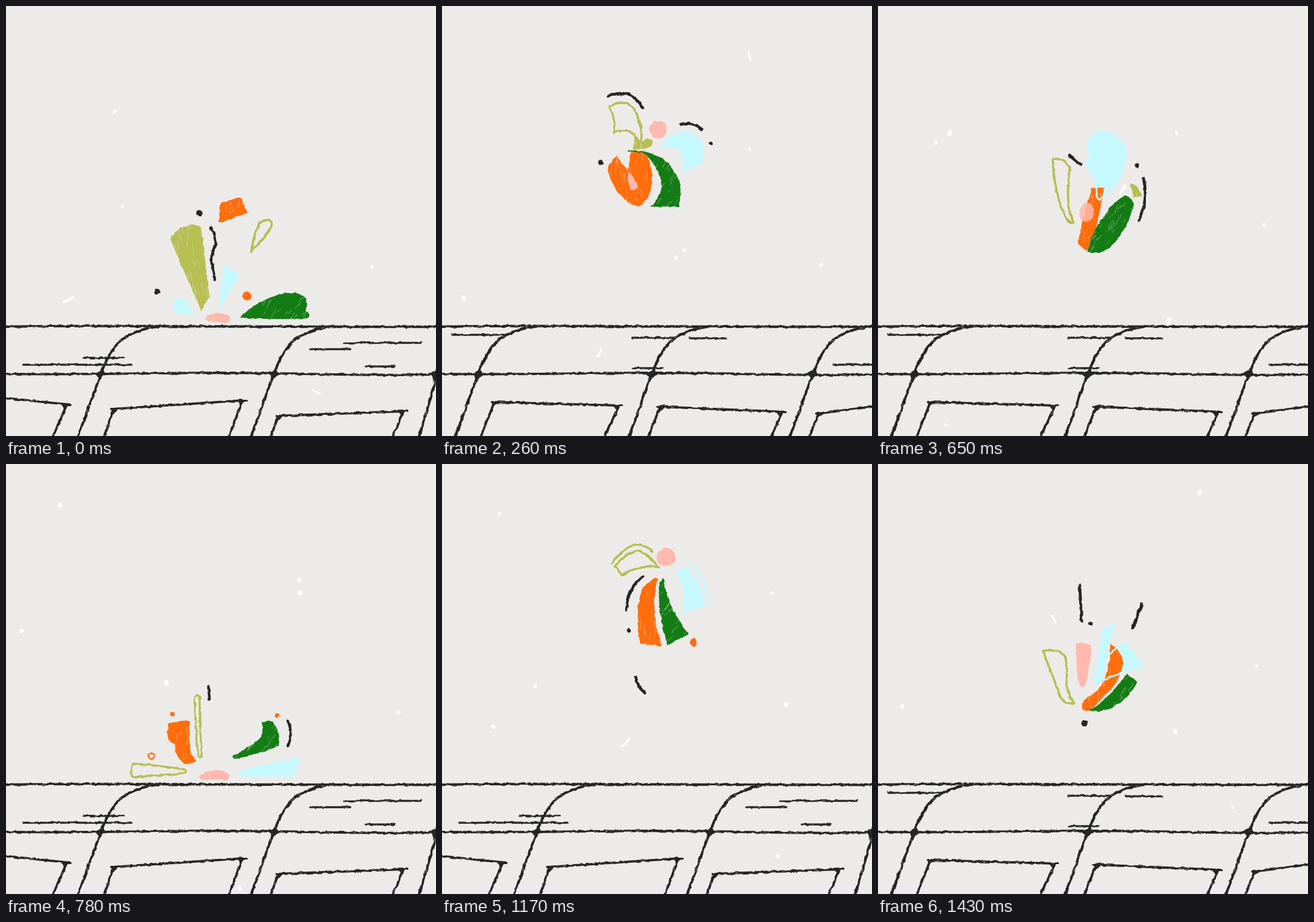
Recreate the animation shown at these times as an HTML page. Size 748x748 px, loop 1560 ms.

```html
<!DOCTYPE html>
<html lang="en">
<head>
<meta charset="utf-8">
<title>Leaping shapes</title>
<style>
html, body { margin: 0; width: 100%; height: 100%; overflow: hidden; background: #ecebe9; }
svg { display: block; width: 100vw; height: 100vh; }
</style>
</head>
<body>
<svg id="stage" viewBox="0 0 748 748" fill="none" stroke-linecap="round" stroke-linejoin="round">
  <defs>
    <filter id="rough" filterUnits="userSpaceOnUse" x="-10" y="0" width="768" height="758" color-interpolation-filters="sRGB">
      <feTurbulence type="fractalNoise" baseFrequency="0.11" numOctaves="2" seed="4"/>
      <feDisplacementMap in="SourceGraphic" scale="4.5" xChannelSelector="R" yChannelSelector="G"/>
    </filter>
  </defs>
</svg>
<script>
const STEP = 130, COUNT = 12;
const BG = '#ecebe9', INK = '#262626', ORANGE = '#ff6d0c', GREEN = '#147c15',
      OLIVE = '#b7be52', BLUE = '#c6f9ff', PINK = '#ffb9ae';
const stage = document.getElementById('stage');
const defs = stage.querySelector('defs');

let seed = 7;
const rand = (a, b) => {
  seed = (seed * 16807) % 2147483647;
  return a + (b - a) * seed / 2147483647;
};

function add(parent, tag, attrs) {
  const el = document.createElementNS('http://www.w3.org/2000/svg', tag);
  for (const k in attrs) el.setAttribute(k, attrs[k]);
  parent.appendChild(el);
  return el;
}
const layer = attrs => add(stage, 'g', { display: 'none', ...attrs });

// Pale crayon scratches kept inside a filled outline
let clips = 0;
function scratch(parent, d, angle, density, alpha) {
  const n = d.match(/-?\d+(\.\d+)?/g).map(Number);
  const xs = n.filter((_, i) => i % 2 === 0), ys = n.filter((_, i) => i % 2);
  const x0 = Math.min(...xs), x1 = Math.max(...xs), y0 = Math.min(...ys), y1 = Math.max(...ys);
  const id = 'clip' + clips++;
  add(add(defs, 'clipPath', { id }), 'path', { d });
  let marks = '';
  for (let i = (x1 - x0) * (y1 - y0) * density; i > 0; i--) {
    const len = rand(5, 20), a = angle + rand(-0.12, 0.12);
    marks += `M${rand(x0, x1).toFixed(1)} ${rand(y0, y1).toFixed(1)}l${(len * Math.cos(a)).toFixed(1)} ${(len * Math.sin(a)).toFixed(1)}`;
  }
  const g = add(parent, 'g', { 'clip-path': `url(#${id})` });
  add(g, 'path', { d: marks, stroke: BG, 'stroke-width': 0.9, opacity: alpha });
}

// Line with dry brush gaps
function brush(parent, d, width) {
  add(parent, 'path', { d, stroke: INK, 'stroke-width': width });
  add(parent, 'path', { d, stroke: BG, 'stroke-width': width * 0.35, opacity: 0.35,
    'stroke-dasharray': '1 17 3 41 2 9 5 60' });
}

// Shapes: [colour, path] filled, [colour, path, width] stroked, [colour, x, y, r] dot
function drawShape(g, [color, a, b, c]) {
  if (typeof a === 'number') add(g, 'circle', { cx: a, cy: b, r: c, fill: color });
  else if (b) add(g, 'path', { d: a, stroke: color, 'stroke-width': b });
  else {
    add(g, 'path', { d: a, fill: color });
    if ([ORANGE, GREEN, OLIVE].includes(color))
      scratch(g, a, color === GREEN ? 2.2 : 1.45, 0.0042, 0.5);
  }
}

const poses = {
  crouch: [
    [ORANGE, 'M375 342L405 333Q409 333 411 338L420 360L372 377Q369 377 370 371L373 346Z'],
    [OLIVE, 'M286 406Q296 384 325 380Q340 380 341 391Q346 440 354 507Q346 514 340 532Q336 520 330 508Q308 458 286 406Z'],
    [OLIVE, 'M427 427C430 402 436 384 444 376C452 370 461 373 463 377C462 388 448 404 427 427Z', 4.2],
    [INK, 'M356 386Q366 400 364 416Q356 434 358 448L363 475', 5],
    [BLUE, 'M379 451L406 468Q386 500 372 528L372 510Z'],
    [BLUE, 'M290 517Q294 508 304 508Q316 510 327 537L298 535Q290 528 290 517Z'],
    [PINK, 'M346 544Q352 534 368 534Q386 535 390 543Q390 551 376 551Q352 552 346 544Z'],
    [GREEN, 'M407 541Q442 509 484 500Q512 496 522 508Q526 520 521 531Q530 534 527 541Q522 546 510 544Q460 546 407 542Z'],
    [INK, 337, 360, 5], [INK, 263, 497, 5], [ORANGE, 419, 505, 8]
  ],
  tuck: [
    [INK, 'M289 157Q305 150 324 153Q340 160 349 177', 5],
    [INK, 'M415 206Q436 200 452 214', 5],
    [OLIVE, 'M346 237Q350 218 341 194Q334 173 319 169Q304 166 291 175Q304 200 298 221Q320 211 334 223', 3.8],
    [OLIVE, 'M333 221L346 236Q358 228 367 232Q367 246 355 249L331 248Q337 236 333 221Z'],
    [PINK, 376, 215, 15.5],
    [BLUE, 'M381 244Q392 221 426 218Q450 222 455 248L454 273Q436 279 421 292Q419 266 413 248Q400 246 381 244Z'],
    [INK, 468, 239, 3], [INK, 276, 272, 4.5],
    [GREEN, 'M324 250Q360 251 385 266Q412 290 415 320Q414 336 413 350L362 349Q380 334 382 314Q378 280 355 260Q345 254 324 253Z'],
    [ORANGE, 'M303 260L323 286L328 254Q345 252 356 260Q370 285 363 320Q355 346 341 348Q322 345 303 320Q288 295 288 280Z'],
    [PINK, 'M323 287Q338 302 341 314Q337 322 328 320Q322 305 323 287Z']
  ],
  peak: [
    [ORANGE, 'M366 177Q376 173 389 175Q386 200 382 225Q378 260 367 286Q358 285 350 272Q352 240 366 177Z'],
    [BLUE, 'M355 97Q358 78 381 76Q412 78 424 112Q420 160 399 180Q393 190 389 187L389 175L378 175Q375 175 371 163Q362 150 354 140Q350 130 361 121Q352 112 355 97Z'],
    [BLUE, 'M375 176Q376 190 379 195Q384 198 389 183', 3],
    [PINK + 'd8', 'M348 219Q350 204 362 203Q374 203 373 219Q373 235 361 236Q348 235 348 219Z'],
    [GREEN, 'M424 185Q440 190 442 200Q438 235 410 272Q395 292 367 289Q370 262 385 233Q400 205 424 185Z'],
    [OLIVE, 'M295 131Q312 128 326 142Q324 180 328 205Q334 232 340 239Q334 243 324 230Q304 195 295 131Z', 3.8],
    [OLIVE, 'M433 165Q448 166 454 184L441 189Q438 178 433 165Z'],
    [INK, 'M324 123L345 138', 5], [INK, 442, 132, 4],
    [INK, 'M455 153Q467 188 453 227', 5]
  ],
  land: [
    [ORANGE, 'M282 452Q292 447 320 446Q316 480 322 504L331 517Q318 523 309 521Q294 508 293 488Q280 484 281 465Z'],
    [ORANGE, 289, 435, 4.5], [ORANGE, 471, 437, 4.5],
    [ORANGE, 'M248 508a5.5 5.5 0 1 0 11 0a5.5 5.5 0 1 0 -11 0Z', 3],
    [OLIVE, 'M328 405Q333 400 337 405Q336 450 341 508Q338 512 335 509Q330 460 328 405Z', 3.4],
    [OLIVE, 'M221 521Q262 524 310 531Q317 535 309 538L222 545Q214 543 221 521Z', 3.4],
    [INK, 'M352 386L354 409', 4.5], [INK, 'M490 447Q501 470 490 491', 4.5],
    [GREEN, 'M446 449Q463 442 467 454Q479 470 474 490Q460 498 430 505Q404 514 398 514Q390 509 398 505Q440 486 446 468Z'],
    [BLUE, 'M405 535Q450 520 512 510L502 544L409 543Q403 540 405 535Z'],
    [PINK, 'M336 543Q350 532 366 532Q382 533 388 542Q387 550 378 550L342 550Q336 548 336 543Z']
  ],
  fan: [
    [OLIVE, 'M290 221Q312 184 334 182Q350 184 357 192', 3.8],
    [OLIVE, 'M297 226Q314 198 334 193Q350 197 373 217Q340 216 311 239Z', 3.8],
    [PINK, 383, 198, 16],
    [INK, 'M348 237Q324 258 327 298', 4.5], [INK, 336, 333, 4],
    [INK, 'M359 411Q365 428 379 437', 5],
    [ORANGE, 'M347 272Q350 245 373 235Q371 262 375 290Q382 325 397 352L359 353Q345 310 347 272Z'],
    [GREEN, 'M377 246Q378 238 384 236Q394 280 440 325L407 349Q382 300 377 246Z'],
    [BLUE, 'M403 219L421 209Q450 235 462 272Q440 280 425 293Q427 250 403 219Z'],
    [BLUE, 'M423 201Q456 218 468 270', 4],
    [ORANGE, 450, 338, 7]
  ],
  kick: [
    [INK, 'M352 110L362 155', 4.5], [INK, 'M404 107L394 166', 4.5], [INK, 381, 190, 5],
    [INK, 'M478 194Q490 188 500 204', 5],
    [OLIVE, 'M361 236Q345 212 308 168Q328 178 332 176Q343 168 341 138Q358 176 375 223', 3.8],
    [BLUE, 'M423 136Q427 160 437 166Q446 170 459 168L397 236L387 222Q405 180 423 136Z'],
    [GREEN, 'M379 257Q400 256 420 234Q445 210 480 210Q490 235 488 244Q480 264 450 263Q425 264 405 272Q390 264 379 257Z'],
    [ORANGE, 'M379 258Q405 272 428 283Q454 303 449 325Q440 350 426 373Q410 358 380 333L391 317Q392 308 382 302Q365 290 371 275Z'],
    [ORANGE, 'M359 314L356 321L388 361L391 359Z'],
    [PINK, 378, 239, 17]
  ],
  drop: [
    [INK, 'M351 211L354 274', 5], [INK, 'M459 243L443 285', 5],
    [INK, 370, 278, 3.5], [INK, 359, 451, 5.5],
    [OLIVE, 'M287 325Q315 320 326 335Q330 355 328 380Q330 405 342 416Q325 421 317 404Z', 3.8],
    [PINK, 'M344 313Q355 309 368 314Q372 320 369 340Q365 375 359 388Q350 388 347 375Q345 340 344 313Z'],
    [BLUE, 'M390 288L414 276Q405 300 400 330Q393 365 388 380L375 382Q384 330 390 288Z'],
    [BLUE, 'M417 316L432 311Q450 330 461 355Q440 358 424 364Q429 340 417 316Z'],
    [ORANGE, 'M404 313Q428 328 426 348Q420 380 395 402Q375 425 366 430Q354 430 355 418Q357 408 372 402Q392 388 398 360Q405 340 404 313Z'],
    [BLUE, 'M401 332L420 316', 3.5], [BLUE, 'M390 377L424 363', 3.5],
    [GREEN, 'M434 364L451 379Q440 405 405 425Q385 433 366 429Q395 415 434 364Z']
  ]
};

// Each step: pose, vertical shift, tilt, vertical stretch
const steps = [
  ['crouch'], ['tuck', 110, -8, 1.08], ['tuck'], ['tuck', -32, 10, 1],
  ['peak'], ['peak', 140, 4, 1],
  ['land'], ['fan', 105, -6, 1.08], ['fan'], ['fan', -38, 8, 1],
  ['kick'], ['drop']
];

// Specks: [x, y, r] dots and [x1, y1, x2, y2] flecks, each set held for two steps
const specks = [
  [[190, 184, 3.5], [203, 349, 3.5], [637, 454, 4], [657, 333, 2], [630, 297, 1], [100, 515, 117, 507], [534, 667, 546, 675]],
  [[535, 249, 3.5], [407, 438, 3.5], [422, 425, 3], [660, 450, 4], [38, 508, 4], [533, 81, 537, 95], [278, 597, 271, 609]],
  [[125, 221, 5], [101, 238, 3.5], [519, 221, 3.5], [672, 380, 3.5], [506, 547, 5], [115, 727, 121, 729], [429, 313, 423, 324]],
  [[93, 72, 4], [510, 202, 4], [511, 224, 4], [27, 291, 4], [279, 381, 4.5], [684, 432, 4], [407, 738, 3.5]],
  [[100, 86, 3], [574, 224, 3], [163, 387, 3.5], [89, 457, 3.5], [598, 419, 4], [583, 683, 3.5], [325, 479, 314, 492]],
  [[560, 50, 4], [658, 352, 3], [43, 422, 4], [517, 465, 4.5], [617, 597, 3.5], [301, 264, 310, 275]]
];

const grounds = [
  {
    posts: [165, 466, 747],
    panels: [[[-30, 679], [106, 693], [82, 748]],
             [[171, 748], [187, 701], [412, 686], [388, 748]],
             [[461, 748], [474, 713], [692, 705], [673, 748]]],
    dashes: [[135, 205, 612], [30, 218, 624], [588, 722, 586], [530, 599, 597], [625, 676, 627]]
  },
  {
    posts: [254, 560],
    panels: [[[-30, 700], [198, 685], [168, 748]],
             [[249, 748], [269, 696], [508, 684], [475, 748]],
             [[551, 748], [573, 685], [770, 700]]],
    dashes: [[15, 155, 579], [138, 200, 593], [343, 392, 610], [260, 360, 627], [684, 760, 579]]
  },
  {
    posts: [63, 365, 645],
    panels: [[[68, 748], [91, 689], [308, 695], [283, 748]],
             [[360, 748], [379, 697], [592, 706], [573, 748]],
             [[639, 748], [655, 709], [770, 694]]],
    dashes: [[18, 115, 572], [331, 408, 577], [430, 495, 578], [331, 385, 630], [682, 760, 624]]
  }
];

const toward = ([x, y], [u, v], len) => {
  const k = len / Math.hypot(u - x, v - y);
  return [x + (u - x) * k, y + (v - y) * k];
};

function drawGround({ posts, panels, dashes }) {
  const g = layer({ filter: 'url(#rough)' });
  brush(g, 'M-10 558Q120 556 260 557T520 558T760 558', 4.4);
  brush(g, 'M-10 640Q120 641 260 639T520 640T760 641', 4.2);
  for (const x of posts) {
    if (x < 740)
      brush(g, `M${x + 104} 557Q${x + 58} 562 ${x + 32} 584Q${x + 12} 606 ${x} 640L${x - 40} 750`, 4.4);
    else
      brush(g, `M${x - 10} 640Q${x + 3} 642 ${x - 1} 657L${x - 29} 750`, 4.4);
    add(g, 'path', { fill: INK, d: `M${x - 13} 639Q${x} 638 ${x + 4} 627Q${x + 4} 638 ${x + 11} 641Q${x} 644 ${x - 5} 656Q${x - 2} 643 ${x - 13} 639Z` });
  }
  for (const pts of panels) {
    brush(g, 'M' + pts.join('L'), 4.2);
    for (let i = 1; i < pts.length - 1; i++) {
      const p = pts[i], a = toward(p, pts[i - 1], 15), b = toward(p, pts[i + 1], 15);
      const m = [(a[0] + b[0] + 4 * p[0]) / 6, (a[1] + b[1] + 4 * p[1]) / 6];
      add(g, 'path', { fill: INK, d: `M${a}Q${m} ${b}L${p}Z` });
      const out = p[0] < pts[i - 1][0] || pts[i - 1][1] > 740 ? -4 : 6;
      add(g, 'path', { stroke: INK, 'stroke-width': 4, d: `M${p}l${out} 0` });
    }
  }
  for (const [a, b, y] of dashes) brush(g, `M${a} ${y}L${b} ${y}`, 3.4);
  return g;
}

function drawSpecks(set) {
  const g = layer({ filter: 'url(#rough)' });
  for (const [a, b, c, d] of set) {
    if (d === undefined) add(g, 'ellipse', { cx: a, cy: b, rx: c * 0.9, ry: c, fill: '#fff', opacity: 0.92 });
    else add(g, 'path', { d: `M${a} ${b}L${c} ${d}`, stroke: '#fff', 'stroke-width': 3.5 });
  }
  return g;
}

function drawStep([name, dy = 0, tilt = 0, stretch = 1]) {
  const g = layer({ filter: 'url(#rough)' });
  const inner = add(g, 'g', { transform: `translate(370 ${250 + dy}) rotate(${tilt}) scale(1 ${stretch}) translate(-370 -250)` });
  poses[name].forEach(s => drawShape(inner, s));
  return g;
}

function drawDarkPanel() {
  const d = 'M551 750L569 683L760 699L760 750Z';
  const g = layer({ filter: 'url(#rough)' });
  add(g, 'path', { d, fill: INK });
  scratch(g, d, 0.03, 0.009, 0.4);
  return g;
}

const speckLayers = specks.map(drawSpecks);
const groundLayers = grounds.map(drawGround);
const darkPanel = drawDarkPanel();
const stepLayers = steps.map(drawStep);

const show = (el, on) => el.setAttribute('display', on ? 'inline' : 'none');
const pick = (list, n) => list.forEach((el, i) => show(el, i === n));

let current = -1;
function render(ms) {
  const n = Math.floor(ms / STEP) % COUNT;
  if (n === current) return;
  current = n;
  pick(stepLayers, n);
  pick(groundLayers, n % 3);
  pick(speckLayers, n >> 1);
  show(darkPanel, n === 10);
}

const start = performance.now();
function tick() {
  render(performance.now() - start);
  requestAnimationFrame(tick);
}
tick();
</script>
</body>
</html>
```
